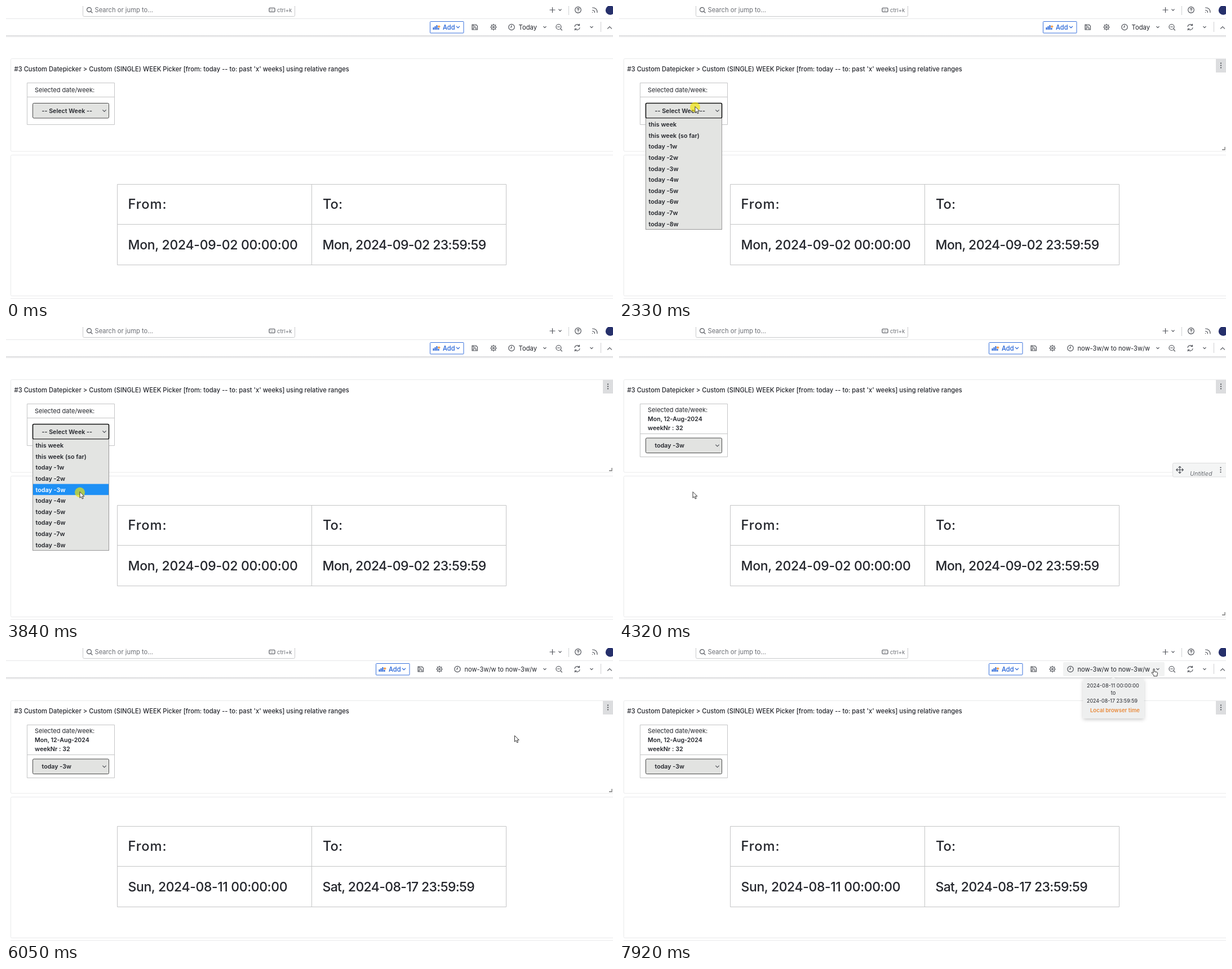
An HTML page that plays this animation: 1077x520 px, repeating every 7990 ms.

```html
<!DOCTYPE html>
<html lang="en">
<head>
<meta charset="utf-8">
<title>Week picker</title>
<style>
  html, body { margin: 0; width: 100%; height: 100%; overflow: hidden; background: #fff; }
  svg { display: block; width: 1077px; height: 520px; }
  text { font-family: Inter, "Open Sans", sans-serif; font-weight: 500; fill: #24262c; white-space: pre; }
  .line { fill: none; stroke: #c4c5c6; }
  .panel { fill: #fff; stroke: #e9eaeb; }
  .icon { fill: none; stroke: #4f5259; stroke-width: 1.2; stroke-linecap: round; stroke-linejoin: round; }
  .thin { font-weight: 400; }
  .bold { font-weight: 600; }
  .grey { fill: #6b6e74; font-weight: 400; }
  .select { fill: #e2e3e1; stroke: #4a4a4a; }
  .select.open { stroke: #111; stroke-width: 1.6; }
  .blue { stroke: #1f5fd6; }
</style>
</head>
<body>
<svg id="stage" viewBox="0 0 1077 520"></svg>
<script>
const LOOP = 7990;
const ENTER = 310, MENU = 1160, OPEN = 2100, PICK = 4110, LOADED = 4970, TIP = 6570;
const ROW_TOP = 200, ROW = 19.64;
const CLICKS = [{ from: 2030, to: 2440 }, { from: 3770, to: PICK }];

// Each move eases to its point; bend shifts the middle of the curve.
const START = { x: 970, y: 509 };
const MOVES = [
  { at: ENTER, ms: 220, x: 940, y: 506 },
  { at: 780, ms: 600, x: 164, y: 161, bendY: 35 },
  { at: 1380, ms: 250, x: 137, y: 175 },
  { at: 1970, ms: 60, x: 134.5, y: 178 },
  { at: 2840, ms: 330, x: 131, y: 308 },
  { at: 3380, ms: 260, x: 130.5, y: 292 },
  { at: 5640, ms: 410, x: 902, y: 155, bendY: 42 },
  { at: 6050, ms: 400, x: 946, y: 38, bendX: 12 },
  { at: 6830, ms: 440, x: 817, y: 40 },
  { at: 7270, ms: 470, x: 949, y: 37 }
];

const text = (x, y, size, s, more = "") => `<text x="${x}" y="${y}" font-size="${size}" ${more}>${s}</text>`;
const path = (d, more = 'class="icon"') => `<path d="${d}" ${more}/>`;
const rect = (x, y, w, h, more) => `<rect x="${x}" y="${y}" width="${w}" height="${h}" ${more}/>`;
const circle = (x, y, r, more = 'class="icon"') => `<circle cx="${x}" cy="${y}" r="${r}" ${more}/>`;
const group = (id, ...parts) => `<g id="${id}">${parts.join("")}</g>`;
const chevron = (x, y, r = 2.2, more) => path(`M${x - r} ${y - r / 2}l${r} ${r}l${r} ${-r}`, more);
const dots = (x, y) => [-4, 0, 4].map(d => circle(x, y + d, 1.1, 'fill="#44474d"')).join("");
const corner = (id, y) => group(id, path(`M1075 ${y - 5}v5h-5`, 'fill="none" stroke="#777" stroke-width="1.3"'));
const lens = (x, y, r) => circle(x, y, r) + path(`M${x + r * .75} ${y + r * .75}l2.6 2.6`);

// Frame split by one horizontal line
const table = (x, y, w, h, split) => path(`M${x} ${y}h${w}v${h}h${-w}zM${x} ${split}h${w}`, 'class="line"');

const select = (id, y, label) =>
  rect(47.5, y, 135, 26.5, `id="${id}" rx="2" class="select"`) +
  text(63.5, y + 17.4, 10.7, label, 'class="bold"') +
  chevron(174.5, y + 13.5, 2.8);

function gear(x, y) {
  let teeth = "";
  for (let a = 0; a < 360; a += 45)
    teeth += path(`M${x} ${y - 4.2}v-1.2`, `class="icon" transform="rotate(${a} ${x} ${y})"`);
  return teeth + circle(x, y, 4) + circle(x, y, 1.4);
}

function topBar() {
  return rect(136.5, -8, 376, 26.5, 'rx="2" fill="#fff" stroke="#c9cacc"') +
    lens(147.5, 6.5, 3.9) +
    text(157.5, 11, 11.2, "Search or jump to...", 'class="grey"') +
    rect(467, 3.5, 10, 7, 'rx="1.2" class="icon"') +
    path("M469 6h6M470 8.5h4", 'stroke="#4f5259" stroke-dasharray="1 1"') +
    text(481, 10.5, 9.6, "ctrl+k", 'class="grey"') +
    path("M965 7h9M969.5 2.5v9") + chevron(983, 7) +
    path("M998.5 0v16M1055.5 28v18", 'stroke="#cfd0d2"') +
    circle(1015, 7, 5.3) + path("M1013.5 5.8q.2-1.6 1.6-1.6q1.6.1 1.5 1.5q-.2 1-1.5 1.5v.6M1015.1 9.8v.1") +
    path("M1040.5 11.2v.1M1040.5 7.5q4 0 4 4M1040.5 3q8.5 0 8.5 8.5") +
    circle(1072, 7.5, 8.2, 'fill="#26306b"') +
    path("M0 22.5H1077", 'stroke="#e6e7e8"') +
    rect(0, 52, 1077, 4, 'fill="url(#shade)"');
}

function toolbar() {
  return group("hover", rect(788, 25, 180, 25, 'rx="2" fill="#f1f2f2"')) +
    group("tools",
      rect(752.5, 27.5, 59.5, 20.5, 'rx="1" fill="#fff" stroke="#3871dc"'),
      path("M758.5 42v-4M761.5 42v-6M764.5 42v-8M767.5 42v-3", 'class="blue" stroke-width="2"'),
      path("M766 36.5h4.5M768.2 34.3v4.5", 'stroke="#f08a2c" stroke-width="1.3"'),
      text(775, 41.6, 11.1, "Add", 'style="fill:#1f5fd6"'),
      chevron(802, 37.5, 2.6, 'class="icon blue" style="stroke:#1f5fd6"'),
      path("M827 33h6.8l2.7 2.7v6.3h-9.5zM829 33v2.8h4M829 42v-3.5h5V42"),
      gear(865, 37.5),
      circle(897, 37.5, 5.2), path("M897 34.5v3h-2")) +
    group("today", text(909.5, 41.6, 11.3, "Today", 'class="thin"')) +
    group("range", text(813.5, 41.6, 11.1, "now-3w/w to now-3w/w", 'class="thin"')) +
    chevron(956, 37.5) + lens(980.5, 37, 4.5) + path("M978.5 37h4") +
    path("M1009 36.5a4.8 4.8 0 0 1 8.5-2v-2.3M1017.5 34.5h-2.7M1018 38.5a4.8 4.8 0 0 1-8.5 2v2.3M1009.5 40.5h2.7") +
    chevron(1039, 37.5) + chevron(1071, 38.3, -3.5);
}

function panels() {
  const title = "#3 Custom Datepicker &gt; Custom (SINGLE) WEEK Picker [from: today -- to: past 'x' weeks] using relative ranges";
  const date = (x, s, gap) => text(x, 432, 23, s, `letter-spacing="${gap}"`);
  return rect(8.5, 93.5, 1080, 164.5, 'rx="2" class="panel"') +
    rect(8.5, 264.5, 1080, 250, 'rx="2" class="panel"') +
    path("M8 519.5H1077", 'stroke="#e9eaeb"') +
    text(14.5, 116, 11.19, title) +
    table(197.5, 316.5, 690, 143, 387.5) + path("M542.5 316.5v143", 'class="line"') +
    text(216.5, 360, 23.7, "From:", 'letter-spacing=".9"') +
    text(562, 360, 23.7, "To:") +
    group("before",
      date(216.5, "Mon, 2024-09-02 00:00:00", -.3),
      date(561.5, "Mon, 2024-09-02 23:59:59", -.6)) +
    group("after",
      date(216.5, "Sun, 2024-08-11 00:00:00", -.4),
      date(561.5, "Sat, 2024-08-17 23:59:59", -.65)) +
    group("menu", rect(1059, 94, 19, 24, 'fill="#dcdddf"'), dots(1068, 105.5)) +
    corner("corner1", 255) + corner("corner2", 511) +
    group("header",
      rect(982.5, 241.5, 100, 24.5, 'rx="2" fill="#f4f5f5" stroke="#dcddde"'),
      path("M989 253.5h12M995 247.5v12M993 249.3l2-2l2 2M993 257.7l2 2l2-2M990.8 251.5l-2 2l2 2M999.2 251.5l2 2l-2 2"),
      text(1013, 263.5, 10.8, "Untitled", 'class="grey" font-style="italic"'),
      dots(1067.5, 253.5));
}

function picker() {
  const names = ["this week", "this week (so far)"];
  for (let n = 1; n <= 8; n++) names.push(`today -${n}w`);
  const label = y => text(51, y, 11, "Selected date/week:", 'class="thin"');
  return group("empty",
      table(37.5, 136.5, 155, 74, 161.5),
      label(152.8),
      select("box", 172.5, "-- Select Week --")) +
    group("chosen",
      table(37.5, 136.5, 155, 94, 189.5),
      label(151),
      text(51, 166.6, 10.6, "Mon, 12-Aug-2024", 'class="bold"'),
      text(51, 182.6, 10.8, "weekNr : 32", 'class="bold"'),
      select("result", 197, "today -3w")) +
    group("list",
      rect(47.5, 199.5, 135, 197, 'fill="#e3e4e2" stroke="#999"'),
      rect(48, 0, 134, ROW, 'id="mark" fill="#1e90f5"'),
      ...names.map((s, i) => text(52.5, 214 + i * ROW, 10.8, s, 'class="bold item"')));
}

function tooltip() {
  const row = (x, y, size, s, more = "") => text(x, y, size, s, `text-anchor="middle" ${more}`);
  return group("tip",
    path("M825.5 55h47.5l4-4l4 4h48.5q2 0 2 2v66q0 2-2 2h-104q-2 0-2-2v-66q0-2 2-2z", 'fill="#eeefef" filter="url(#drop)"'),
    row(876.5, 69.5, 9.2, "2024-08-11 00:00:00", 'class="thin"'),
    row(877, 82.5, 9.2, "to", 'class="thin"'),
    row(875, 96.5, 8.9, "2024-08-17 23:59:59", 'class="thin"'),
    row(880, 113.8, 9.6, "Local browser time", 'class="bold" style="fill:#e8893a"'));
}

function pointer() {
  const skin = 'fill="#fff" stroke="#333"';
  return group("pointer",
    group("ring", circle(.5, 1.5, 9, 'fill="#f5e600" opacity=".66"')),
    group("arrow", path("M.5.5v10.8l2.5-2.3l1.800 4l1.900-.9l-1.800-3.800h3.400z", skin)),
    group("hand", path("M-.9 1q0-1.200 1-1.200t1 1.200v4l4.200.8q1.500.5 1.300 2l-.8 3.200v2h-6v-1.700l-3.600-4q-.4-1.500 1.200-1.200l1.700 1.300z", skin)));
}

const stage = document.getElementById("stage");
stage.innerHTML = `<defs>
  <linearGradient id="shade" x2="0" y2="1"><stop stop-color="#d5d6d8"/><stop offset="1" stop-color="#fff"/></linearGradient>
  <filter id="drop" x="-20%" y="-20%" width="140%" height="150%"><feDropShadow dx="0" dy="2" stdDeviation="3" flood-color="#000" flood-opacity=".22"/></filter>
  </defs>` + topBar() + panels() + picker() + toolbar() + tooltip() + pointer();

const el = {};
stage.querySelectorAll("[id]").forEach(e => el[e.id] = e);
const items = [...stage.querySelectorAll(".item")];
const show = (id, on) => el[id].style.display = on ? "" : "none";

function pointerAt(t) {
  let p = START;
  for (const m of MOVES) {
    if (t < m.at) break;
    const k = Math.min(1, (t - m.at) / m.ms);
    const e = k * k * (3 - 2 * k), arc = 4 * e * (1 - e);
    p = {
      x: p.x + (m.x - p.x) * e + (m.bendX || 0) * arc,
      y: p.y + (m.y - p.y) * e + (m.bendY || 0) * arc
    };
  }
  return p;
}

function draw(t) {
  const { x, y } = pointerAt(t);
  const present = t >= ENTER, open = t >= OPEN && t < PICK, picked = t >= PICK;
  const onLower = present && !open && y > 264;
  const onUpper = present && !onLower && y > 93;
  const onButton = y < 50;

  show("pointer", present);
  el.pointer.setAttribute("transform", `translate(${x} ${y})`);
  show("ring", CLICKS.some(c => t >= c.from && t < c.to));
  show("arrow", !onButton);
  show("hand", onButton);

  show("header", onLower);
  show("corner2", onLower);
  show("corner1", onUpper);
  show("menu", t >= MENU);

  show("empty", !picked);
  show("chosen", picked);
  show("list", open);
  el.box.classList.toggle("open", open);
  const row = open && y > ROW_TOP ? Math.floor((y - ROW_TOP) / ROW) : -1;
  show("mark", row >= 0);
  el.mark.setAttribute("y", ROW_TOP + row * ROW);
  items.forEach((e, i) => e.style.fill = i === row ? "#fff" : "");

  show("today", !picked);
  show("range", picked);
  el.tools.setAttribute("transform", `translate(${picked ? -96 : 0} 0)`);
  show("before", t < LOADED);
  show("after", t >= LOADED);
  show("hover", onButton);
  show("tip", t >= TIP);
}

const start = performance.now();
function frame() {
  draw((performance.now() - start) % LOOP);
  requestAnimationFrame(frame);
}
frame();
</script>
</body>
</html>
```
